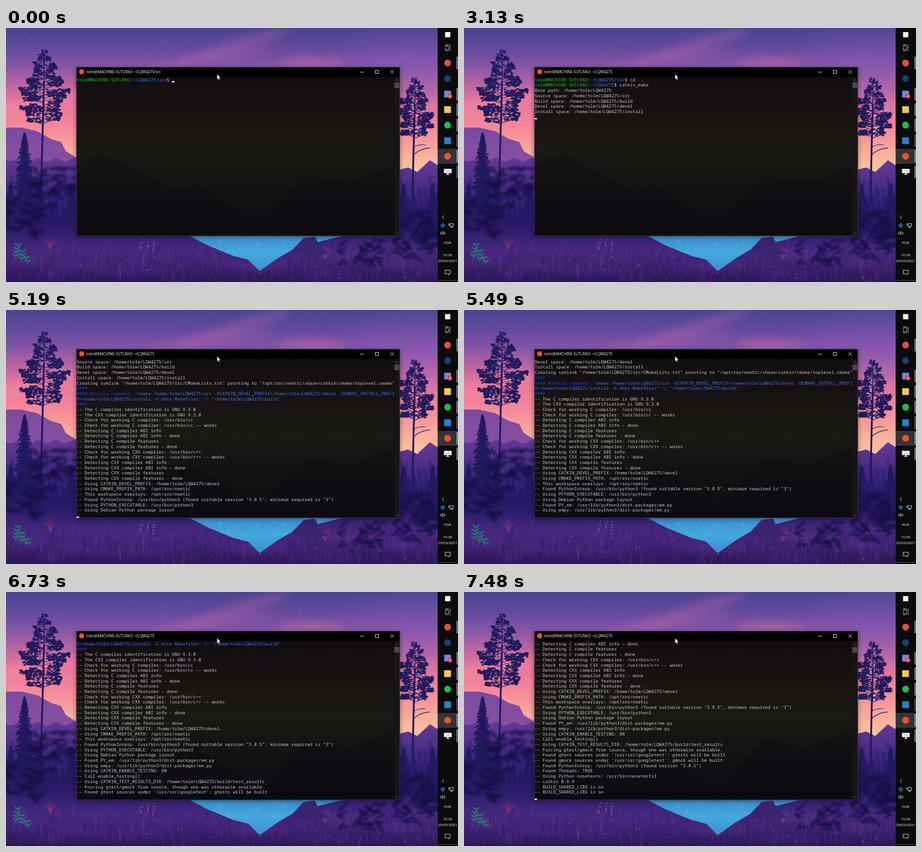
An HTML page with a canvas for the animation above (8 s loop, 998 px wide and 561 px high).

```html
<!DOCTYPE html>
<html lang="en">
<head>
<meta charset="utf-8">
<title>Terminal build</title>
<style>
html, body { margin: 0; width: 100%; height: 100%; overflow: hidden; background: #2c1b62; }
canvas, svg, pre { position: absolute; left: 0; top: 0; }
svg text { font-family: "Open Sans", sans-serif; fill: #fff; }
pre {
  margin: 0; left: 155.5px; top: 108.2px; color: #ccc;
  font: 15px/18px "Noto Sans Mono", monospace;
  transform-origin: 0 0; transform: scale(.64974);
}
pre u { color: #16c60c; text-decoration: none; }
pre b { color: #3b78ff; font-weight: 400; }
pre i { color: #1a41dc; font-style: normal; }
</style>
</head>
<body>
<canvas id="bg" width="998" height="561"></canvas>
<svg width="998" height="561" viewBox="0 0 998 561">
  <defs>
    <linearGradient id="glass" x2="0" y2="1">
      <stop stop-color="#110b11"/><stop offset=".25" stop-color="#171211"/>
      <stop offset=".5" stop-color="#1a1914"/><stop offset=".75" stop-color="#141113"/>
      <stop offset="1" stop-color="#0e0c13"/>
    </linearGradient>
  </defs>
  <!-- window -->
  <rect x="155" y="86" width="715" height="373.5" fill="url(#glass)"/>
  <path d="M156 302 215 275 375 362 420 345 560 432 662 326 760 342 857 304V459H156Z" fill="#0a0714" opacity=".24"/>
  <rect x="155" y="86" width="715" height="22" fill="#020102"/>
  <rect x="857" y="108" width="12.5" height="351" fill="#171416"/>
  <rect id="thumb" x="857.5" width="11" height="12.5" fill="#4c464e"/>
  <path d="M860.5 116.3l2.7-2.7 2.7 2.7M860.5 451.5l2.7 2.7 2.7-2.7" fill="none" stroke="#777"/>
  <rect x="155.5" y="86.5" width="714" height="372.5" fill="none" stroke="#55505c" stroke-width=".7"/>
  <circle cx="167" cy="96.7" r="5.7" fill="#e4572b"/>
  <text id="title" x="177" y="100" font-size="8.3"></text>
  <path d="M782 97.5h8M815.5 93.5h7v7h-7ZM849 93.5l7 7m0-7l-7 7" fill="none" stroke="#fff"/>
  <rect id="cursor" width="5.85" height="2.7" fill="#f2f2f2"/>
  <path d="M466 102v11.5l2.6-2.3 1.9 4.1 1.8-.8-1.9-4h3.4Z" fill="#fff" stroke="#111" stroke-width=".5"/>
  <!-- taskbar -->
  <rect x="953" width="45" height="561" fill="#0b0b0e"/>
  <rect x="953" y="267" width="45" height="33" fill="#343438"/>
  <rect x="969.5" y="9" width="11.5" height="11.5" fill="#fff"/>
  <path d="M970 39.5h7.5v8H970ZM969.5 37h8.500M969.500 50h8.500M980.500 37v14" fill="none" stroke="#ddd" stroke-dasharray="8 1.500"/>
  <g id="apps"></g>
  <circle cx="980" cy="150.5" r="5.2" fill="#e8413f"/>
  <text x="980" y="153.2" font-size="7" text-anchor="middle">4</text>
  <path d="M967 311h17v9.5h-17ZM974 320.5h3v2.500h2.500v1.300h-8V323h2.500Z" fill="#eee"/>
  <text x="975.5" y="318" font-size="5.5" text-anchor="middle" style="fill:#555">1.1</text>
  <circle cx="964.5" cy="436" r="5" fill="#24508c"/>
  <g fill="none" stroke="#f0f0f0">
    <path d="M967 414l-4 4 4 4M980 432h8v6h-8ZM984 438v2.5M981.5 440.5h5M977.5 431.5v4h2"/>
    <path d="M959.5 451.5h2l2.500-2.500v8l-2.500-2.500h-2ZM966 451q1.500 2 0 4M968 449.500q2.500 3.500 0 7" stroke-width=".9"/>
    <path d="M969.5 535h11.500v8h-3.500v2.500l-2.500-2.500h-5.500Z"/>
    <path d="M953 557.5h45" stroke="#55555a"/>
  </g>
  <g font-size="8" text-anchor="middle">
    <text x="975" y="477">POR</text>
    <text x="975" y="504">10:36</text>
    <text x="975" y="516.5">29/03/2021</text>
  </g>
</svg>
<pre id="term"></pre>
<script>
const $ = id => document.getElementById(id);

// ---- wallpaper, painted once ----
const g = $('bg').getContext('2d');
const INK = '#201a5c';
let seed = 7;
const rnd = () => (seed = seed * 16807 % 2147483647) / 2147483647;
const span = (a, b) => a + (b - a) * rnd();
const pick = list => list[Math.floor(rnd() * list.length)];
const times = (n, fn) => { for (let i = 0; i < n; i++) fn(i, i / n); };

function fade(y0, y1, ...stops) {
  const f = g.createLinearGradient(0, y0, 0, y1);
  stops.forEach((c, i) => f.addColorStop(i / (stops.length - 1), c));
  return f;
}
// fills a polyline closed at height `end`
function ridge(fill, end, ...pts) {
  g.fillStyle = fill;
  g.beginPath();
  g.moveTo(pts[0][0], end);
  for (const p of pts) g.lineTo(...p);
  g.lineTo(pts.at(-1)[0], end);
  g.fill();
}
function blob(fill, x, y, rx, ry, turn = 0) {
  g.fillStyle = fill;
  g.beginPath();
  g.ellipse(x, y, rx, ry, turn, 0, 7);
  g.fill();
}
function curve(color, width, x0, y0, cx, cy, x1, y1) {
  g.strokeStyle = color;
  g.lineWidth = width;
  g.beginPath();
  g.moveTo(x0, y0);
  g.quadraticCurveTo(cx, cy, x1, y1);
  g.stroke();
}
function soft(blur, alpha, paint) {
  g.save();
  g.filter = `blur(${blur}px)`;
  g.globalAlpha = alpha;
  paint();
  g.restore();
}
function spruce(x, y, h, w, color) {
  curve(color, 3, x, y, x, y + h / 2, x, y + h);
  for (let i = 0; i < h; i += 2.5) for (const s of [-1, 1]) {
    const r = 2 + w * (i / h) ** .75 * span(.35, 1);
    curve(color, 3, x, y + i - 3, x + s * r * .6, y + i, x + s * r, y + i + span(1, 5));
  }
}
// bare trunk with a crown of leafy branches that is widest two thirds down
function pine(x, y, crown, w, foot) {
  curve(INK, 4, x, y + crown * .4, x - 3, y + crown, x - 8 * w / 50, foot);
  curve(INK, 2, x, y, x, y + crown / 2, x - 1, y + crown);
  const rows = Math.round(crown / 8);
  times(rows, (i, u) => {
    for (const s of [-1, 1]) {
      const r = (7 + w * Math.sin(2.4 * u)) * span(.55, 1.05), by = y + u * crown + span(-4, 4);
      curve(INK, 1.2, x, by + 9, x + s * r * .5, by + 3, x + s * r, by);
      times(r * 1.1, () => {
        const d = r * Math.sqrt(rnd());
        blob(INK, x + s * d, by + span(-5, 4), span(1, 4), span(.7, 2), span(-.5, .5));
      });
    }
  });
}
function frond(color, x, y, n, size, lean) {
  curve(color, 1, x, y, x, y - n * 4, x + lean, y - n * 8);
  times(n, i => {
    for (const s of [-1, 1]) blob(color, x + lean * (i / n) ** 2 + s * size * .7, y - 8 - i * 8, size, size * .3, -s * .7);
  });
}

function wallpaper() {
  g.fillStyle = fade(0, 330, '#49458f', '#61499c', '#8355a6', '#b966a0', '#e5789c', '#f4839a', '#f79a98', '#fab79b', '#fbc9a0');
  g.fillRect(0, 0, 998, 561);
  soft(30, .4, () => blob('#8a5ab8', 930, 90, 190, 70));
  soft(9, .4, () => {
    blob('#b865ac', 500, 42, 135, 13, -.3);
    blob('#a862ae', 450, 68, 150, 10, -.15);
    blob('#e8759f', 675, 76, 75, 10);
    blob('#ff8da0', 70, 165, 110, 14, -.2);
  });
  times(30, () => blob('#d8b4e0', span(0, 950), span(4, 80), .7, .7));

  // hills and forest
  ridge(fade(215, 330, '#7d4a9e', '#8a50a2'), 420, [0, 220], [34, 220], [69, 228], [99, 245], [122, 252], [132, 272], [157, 287]);
  ridge(fade(285, 400, '#633a94', '#35217a'), 561, ...Array.from({ length: 20 }, (_, i) => [i * 8.3, 291 + 4 * Math.sin(i * 1.3)]));
  ridge(fade(290, 400, '#643a95', '#35217a'), 561, [869, 313], [888, 308], [908, 318], [936, 292], [953, 303]);
  for (let row = 0; row < 4; row++) for (let x = row * 3; x < 953; x += 13) {
    if (x < 160 || x > 866) spruce(x, span(330, 352) + row * 20, 90, 13, ['#402981', '#352377', '#2c1d6c', '#271a65'][row]);
  }
  g.fillStyle = fade(420, 561, '#2a1b6800', '#33206f', '#45287e', '#3d2270', '#2b1856');
  g.fillRect(0, 420, 953, 141);

  // meadow
  soft(8, .3, () => times(18, () => blob(pick(['#6a3d98', '#2b1960', '#56318a']), span(0, 953), span(500, 550), span(30, 70), span(5, 10))));
  g.globalAlpha = .5;
  times(800, () => {
    const x = span(0, 953), y = span(495, 571), h = span(8, 32);
    curve(pick(['#241554', '#2b1a60', '#332068', '#5a3488', '#74439a']), span(.6, 1.3), x, y, x, y - h * .6, x + span(-7, 7), y - h);
  });
  for (const [x, y] of [[98, 489], [705, 510]])
    for (let i = -3; i < 4; i++) curve('#a03a70', 1.6, x, y, x + i * 2, y - 14, x + i * 5, y - 27 + Math.abs(i) * 3);
  g.globalAlpha = .8;
  times(24, i => blob('#b9619e', 299 + i % 3 * 14 + span(-3, 3), 468 + i + span(-3, 3), 1.5, 1));
  times(22, () => blob(pick(['#b4694f', '#9f4a72']), span(110, 940), span(500, 555), 1.5, 1.3));
  g.globalAlpha = 1;
  for (let i = 0; i < 3; i++) frond('#277a76', 22 + i * 13, 510 + i * 6, 4 - i, 5, 8 - i * 8);

  // lake inside its shore, then the rocks' shading
  ridge(fade(455, 537, '#3a86c6', '#45a8df', '#3c8fd0'), 450, [405, 459], [445, 480], [501, 503], [535, 512], [560, 537], [598, 510], [633, 489], [657, 464], [680, 461], [687, 473], [740, 460]);
  soft(2, .25, () => times(50, () => blob('#72c7ee', span(470, 620), span(462, 490), span(.6, 1.5), span(4, 9))));
  ridge('#39246f', 500, [628, 500], [640, 484], [660, 464], [682, 461], [692, 480], [715, 500]);

  // trees
  pine(84, 55, 155, 50, 400);
  pine(903, 118, 125, 35, 390);
  curve(INK, 1.4, 900, 280, 915, 266, 936, 265);
  curve(INK, 1.2, 900, 264, 910, 256, 927, 258);
  spruce(41, 234, 165, 32, INK);
  for (const x of [10, 70, 145, 878, 942]) spruce(x, span(343, 352), 75, 17, '#231a60');

  // out-of-focus foreground
  const leaf = (x0, x1, y0, y1) => blob('#171147', span(x0, x1), span(y0, y1), span(9, 19), span(3, 5), span(-.9, .9));
  soft(2.5, .75, () => times(34, i => {
    leaf(60, 155, 310, 375);
    leaf(-10, 110, 375, 455);
    leaf(868, 955, 400, 465);
  }));
  soft(1, .55, () => times(26, () => {
    leaf(735, 830, 465, 530);
    leaf(860, 950, 455, 510);
  }));
  soft(5, .35, () => {
    g.fillStyle = '#000';
    g.fillRect(154, 88, 717, 374);
  });
}
wallpaper();

// ---- taskbar buttons ----
const SLOT = 34.3;
const apps = ['#dd5144 round', '#1d3f70 round', '#7289da', '#f5c84c', '#1db954 round', '#2383c9', '#e4572b round', 'none'];
$('apps').innerHTML = apps.map((app, i) => {
  const [color, round] = app.split(' '), y = 77.4 + SLOT * i;
  const mark = i === 1 ? '' : `<rect x="995.2" y="${y - 14}" width="1.7" height="28" fill="${i === 5 ? '#8f7aad' : '#c9c4ca'}"/>`;
  return `<rect x="967.5" y="${y - 7.5}" width="15" height="15" rx="${round ? 7.5 : 1}" fill="${color}"/>${mark}`;
}).join('');
const badge = $('apps').lastElementChild;

// ---- terminal ----
const HOST = 'tolm@MACHINE-5UTLRAO', DIR = '~/LQW4275', HOME = '/home/tolm/LQW4275';
const prompt = path => `<u>${HOST}</u>:<b>${path}</b>$ `;
const dashed = text => text.trim().split('\n').map(s => '-- ' + s.trim());
const lines = [
  prompt(DIR + '/src') + 'cd ..',
  prompt(DIR) + 'catkin_make',
  `Base path: ${HOME}`,
  ...['src', 'build', 'devel', 'install'].map(d => `${d === 'src' ? 'Source' : d[0].toUpperCase() + d.slice(1)} space: ${HOME}/${d}`),
  `Creating symlink "${HOME}/src/CMakeLists.txt" pointing to "/opt/ros/noetic/share/catkin/cmake/toplevel.cmake"`,
  '<i>####</i>',
  `<i>#### Running command: </i><b>"cmake ${HOME}/src -DCATKIN_DEVEL_PREFIX=${HOME}/devel -DCMAKE_INSTALL_PREFI</b>`,
  `<b>X=${HOME}/install -G Unix Makefiles"</b><i> in </i><b>"${HOME}/build"</b>`,
  '<i>####</i>',
  ...dashed(`The C compiler identification is GNU 9.3.0
    The CXX compiler identification is GNU 9.3.0`),
  ...[['C', 'cc'], ['CXX', 'c++']].flatMap(([c, bin]) => dashed(`Check for working ${c} compiler: /usr/bin/${bin}
    Check for working ${c} compiler: /usr/bin/${bin} -- works
    Detecting ${c} compiler ABI info
    Detecting ${c} compiler ABI info - done
    Detecting ${c} compile features
    Detecting ${c} compile features - done`)),
  ...dashed(`Using CATKIN_DEVEL_PREFIX: ${HOME}/devel
    Using CMAKE_PREFIX_PATH: /opt/ros/noetic
    This workspace overlays: /opt/ros/noetic
    Found PythonInterp: /usr/bin/python3 (found suitable version "3.8.5", minimum required is "3")
    Using PYTHON_EXECUTABLE: /usr/bin/python3
    Using Debian Python package layout
    Found PY_em: /usr/lib/python3/dist-packages/em.py
    Using empy: /usr/lib/python3/dist-packages/em.py
    Using CATKIN_ENABLE_TESTING: ON
    Call enable_testing()
    Using CATKIN_TEST_RESULTS_DIR: ${HOME}/build/test_results
    Forcing gtest/gmock from source, though one was otherwise available.
    Found gtest sources under '/usr/src/googletest': gtests will be built
    Found gmock sources under '/usr/src/googletest': gmock will be built
    Found PythonInterp: /usr/bin/python3 (found version "3.8.5")
    Found Threads: TRUE
    Using Python nosetests: /usr/bin/nosetests3
    catkin 0.8.9
    BUILD_SHARED_LIBS is on
    BUILD_SHARED_LIBS is on`)
];

const ROWS = 30, CELL_W = 5.8477, CELL_H = 11.6953, BEAT = 65;
const keys = [700, 785, 870, 1190, 1390];
// output bursts: [start ms, further beats, lines printed by the end]
const bursts = [
  [3130, 1, 12], [3380, 0, 13], [3880, 2, 15], [4240, 3, 21], [4620, 0, 23], [4800, 1, 26],
  [5190, 0, 32], [5490, 2, 37], [6680, 3, 43], [7160, 0, 45], [7480, 0, 46]
];
const blinks = [[270, 700], [5310, 5800], [6300, 6830]];

function printed(t) {
  let n = t < 1485 ? 0 : t < 3060 ? 1 : 2;
  for (const [start, beats, total] of bursts) {
    if (t < start) break;
    const part = (Math.floor((t - start) / BEAT) + 1) / (beats + 1);
    n += Math.round((total - n) * Math.min(1, part));
  }
  return n;
}
// text at the prompt, or null while a command runs
function typed(t) {
  if (t < 1485) return 'cd ..'.slice(0, keys.filter(k => k <= t).length);
  if (t < 1580 || t >= 3060) return null;
  return t < 2380 ? '' : t < 2460 ? 'cd ..' : 'catkin_make';
}

let shown;
function show(t) {
  const n = printed(t), input = typed(t);
  const hidden = blinks.some(([off, on]) => t >= off && t < on);
  const top = Math.max(0, n + 1 - ROWS);
  const path = DIR + (n ? '' : '/src');
  const col = input === null ? 0 : `${HOST}:${path}$ ${input}`.length;

  const text = [...lines.slice(top, n), input === null ? '' : prompt(path) + input].join('\n');
  if (text !== shown) $('term').innerHTML = shown = text;
  $('title').textContent = `${HOST}: ${DIR}${t < 1580 ? '/src' : ''}`;
  $('thumb').setAttribute('y', top < 9 ? 120.5 : 121.2);
  $('cursor').setAttribute('x', 155.5 + col * CELL_W);
  $('cursor').setAttribute('y', 105.5 + (n - top + 1) * CELL_H);
  $('cursor').setAttribute('opacity', hidden ? 0 : 1);
  badge.setAttribute('fill', t < 50 ? '#8f7aad' : '#c9c4ca');
}
function frame(now) {
  show(now % 8000);
  requestAnimationFrame(frame);
}
frame(0);
</script>
</body>
</html>
```
